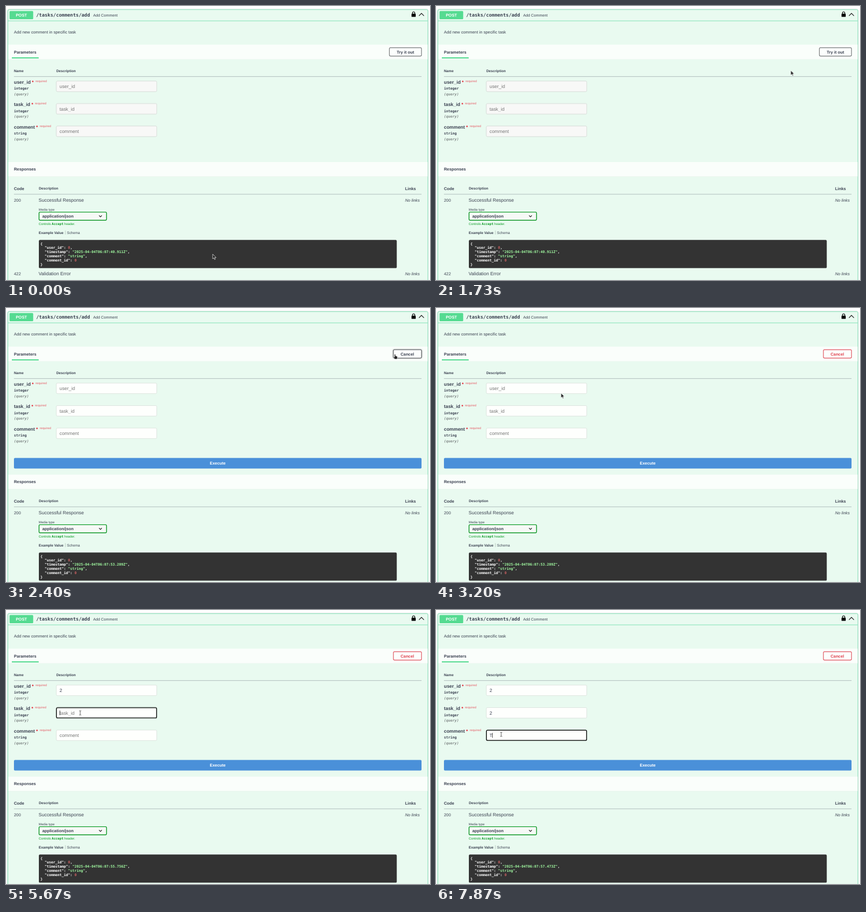
An HTML page that plays this animation: 800 px wide and 518 px high, repeating every 8 s.

```html
<!DOCTYPE html>
<html lang="en">
<head>
<meta charset="utf-8">
<title>API docs: add comment</title>
<style>
html, body { margin: 0; width: 100%; height: 100%; overflow: hidden; background: #fff; }
svg { display: block; width: 800px; height: 518px; }
text {
  font: 7.78px "Liberation Sans", Arial, sans-serif;
  fill: #3b4151; white-space: pre; text-rendering: geometricPrecision;
}
.b { font-weight: 700; }
.i { font-style: italic; }
.l { font-size: 8.89px; }
.s { font-size: 6.67px; }
.xs { font-size: 6.11px; }
.mid { text-anchor: middle; }
.w { fill: #fff; }
.mono { font-family: "DejaVu Sans Mono", monospace; font-weight: 700; }
.code { font-size: 6.67px; fill: #fff; }
.str { fill: #a2fca2; }
.num { fill: #d36363; }
.star { fill: #e3202f; }
.req { font-size: 5.9px; fill: #e5606a; }
.hint { fill: #757575; }
.ok { fill: #0b9a24; }
.strip { fill: #fafefb; filter: drop-shadow(0 .6px .6px rgba(0,0,0,.1)); }
.rule { fill: rgba(59,65,81,.42); }
.field { fill: #fefffd; stroke: #d3d8d4; stroke-width: .7; }
.off { fill: #f8f8f7; }
.btn { fill: #fcfefd; stroke: #747678; stroke-width: 1.15; filter: drop-shadow(0 .5px .6px rgba(0,0,0,.12)); }

/* one shared 8 s clock; switches jump, the pointer glides */
.sw { animation: 8s step-end infinite; }
.idle { animation-name: idle; }
.live { animation-name: live; }
.shift { animation-name: shift; }
.ph1 { animation-name: ph1; } .v1 { animation-name: v1; }
.ph2 { animation-name: ph2; } .v2 { animation-name: v2; }
.ph3 { animation-name: ph3; } .v3 { animation-name: v3; }
.ts2 { animation-name: ts2; } .ts3 { animation-name: ts3; } .ts4 { animation-name: ts4; }
.ring { animation-name: ring; }
.caret { animation-name: caret; }
.hover { animation-name: hand; }
.hand { animation-name: hand; }
.beam { animation-name: beam; }
.arrow { animation-name: arrow; }
.pointer { animation: move 8s linear infinite; }
.edge { animation: edge 8s linear infinite; }
.word { animation: word 8s linear infinite; }

@keyframes idle { 0% { opacity: 1 } 29.875%, 100% { opacity: 0 } }
@keyframes live { 0% { opacity: 0 } 29.875%, 100% { opacity: 1 } }
@keyframes shift { 0% { transform: none } 29.875%, 100% { transform: translateY(20px) } }
@keyframes ph1 { 0% { opacity: 1 } 62.375%, 100% { opacity: 0 } }
@keyframes v1 { 0% { opacity: 0 } 62.375%, 100% { opacity: 1 } }
@keyframes ph2 { 0% { opacity: 1 } 83.25%, 100% { opacity: 0 } }
@keyframes v2 { 0% { opacity: 0 } 83.25%, 100% { opacity: 1 } }
@keyframes ph3 { 0% { opacity: 1 } 98.25%, 100% { opacity: 0 } }
@keyframes v3 { 0% { opacity: 0 } 98.25%, 100% { opacity: 1 } }
@keyframes ts2 { 0% { opacity: 0 } 29.875% { opacity: 1 } 62.375%, 100% { opacity: 0 } }
@keyframes ts3 { 0% { opacity: 0 } 62.375% { opacity: 1 } 83.875%, 100% { opacity: 0 } }
@keyframes ts4 { 0% { opacity: 0 } 83.875%, 100% { opacity: 1 } }
@keyframes ring {
  0% { opacity: 0; transform: none }
  45.75% { opacity: 1; transform: none }
  70.75% { opacity: 1; transform: translateY(42.5px) }
  90.75%, 100% { opacity: 1; transform: translateY(85px) }
}
@keyframes caret {
  0% { opacity: 0; transform: translate(101.2px,147.5px) }
  45.75% { opacity: 1; transform: translate(101.2px,147.5px) }
  53.2% { opacity: 0; transform: translate(101.2px,147.5px) }
  57.4% { opacity: 1; transform: translate(101.2px,147.5px) }
  62.375% { opacity: 1; transform: translate(105.5px,147.5px) }
  68.75% { opacity: 0; transform: translate(105.5px,147.5px) }
  70.75% { opacity: 1; transform: translate(101.2px,190px) }
  78.25% { opacity: 0; transform: translate(101.2px,190px) }
  83.25% { opacity: 1; transform: translate(105.5px,190px) }
  90.75% { opacity: 1; transform: translate(101.2px,232.5px) }
  98.25%, 100% { opacity: 1; transform: translate(106px,232.5px) }
}
@keyframes hand { 0% { opacity: 0 } 27.9% { opacity: 1 } 37.9%, 100% { opacity: 0 } }
@keyframes beam {
  0% { opacity: 0 } 40.4% { opacity: 1 } 63.5% { opacity: 0 }
  67.4% { opacity: 1 } 85.1% { opacity: 0 } 88.6%, 100% { opacity: 1 }
}
@keyframes arrow {
  0% { opacity: 1 } 27.9% { opacity: 0 } 37.9% { opacity: 1 } 40.4% { opacity: 0 }
  63.5% { opacity: 1 } 67.4% { opacity: 0 } 85.1% { opacity: 1 } 88.6%, 100% { opacity: 0 }
}
@keyframes move {
  0%, 6.4% { transform: translate(390px,469px) }
  10.9%, 13.2% { transform: translate(470px,370px) }
  16.6%, 19% { transform: translate(640px,128px) }
  21.6% { transform: translate(669px,122px) }
  29.1%, 37.7% { transform: translate(734px,87px) }
  40% { transform: translate(236px,161px) }
  44.1%, 62.5% { transform: translate(178px,156px) }
  69.1%, 83.4% { transform: translate(140px,194.5px) }
  90%, 100% { transform: translate(123px,235px) }
}
@keyframes edge { 0%, 30% { stroke: #6b6e72 } 33.8%, 100% { stroke: #e4505c } }
@keyframes word { 0%, 30% { fill: #3b4151 } 33.8%, 100% { fill: #e0404e } }
</style>
</head>
<body>
<svg viewBox="0 0 800 518">
  <rect x="3.5" y="6.8" width="792.5" height="540" rx="2.2" fill="#e9faf0" stroke="#62dba6" stroke-width=".8"
        style="filter:drop-shadow(0 0 .8px rgba(0,0,0,.2))"/>
  <rect x="4" y="27.7" width="791.6" height=".8" fill="#62dba6"/>

  <!-- summary bar -->
  <rect x="6.7" y="9.5" width="44.6" height="15.6" rx="1.7" fill="#55db91"/>
  <text class="b w mid" x="29" y="20">POST</text>
  <text class="mono l" x="57" y="20">/tasks/comments/add</text>
  <text x="164.4" y="19.7" style="font-size:7.22px">Add Comment</text>
  <rect x="765.2" y="14.6" width="7.8" height="6" rx=".9"/>
  <path d="M766.9 15V13.2a2.2 2.2 0 0 1 4.4 0V15" fill="none" stroke="#000" stroke-width="1.2"/>
  <path d="M779.2 18.6L783.9 13.9L788.6 18.6" fill="none" stroke="#111" stroke-width="1.2"/>

  <text x="15" y="51.9">Add new comment in specific task</text>

  <!-- parameters -->
  <rect class="strip" x="4" y="73" width="791.6" height="27.8"/>
  <text class="b" x="15" y="89.6">Parameters</text>
  <rect x="11" y="97" width="50.7" height="2.2" fill="#55db91"/>
  <g class="sw idle">
    <rect class="btn" x="723.4" y="78.8" width="60.5" height="15.8" rx="2"/>
    <text class="b mid" x="753.6" y="89.6">Try it out</text>
  </g>
  <g class="sw live">
    <rect class="sw hover" x="730.4" y="78.4" width="54" height="16.6" rx="2.4" fill="#888"
          style="filter:drop-shadow(0 0 1.4px rgba(0,0,0,.45))"/>
    <rect class="btn edge" x="731" y="78.8" width="52.9" height="15.8" rx="2"/>
    <text class="b mid word" x="757.2" y="89.6">Cancel</text>
  </g>
  <text class="b s" x="15" y="124.8">Name</text>
  <text class="b s" x="95" y="124.8">Description</text>
  <rect class="rule" x="15" y="132.9" width="769" height=".8"/>

  <g>
    <text class="b l" x="15" y="146.9">user_id</text>
    <text class="b l star" x="48.7" y="146.9">*</text>
    <text class="req" x="55.5" y="143.7">required</text>
    <text class="mono s" x="15" y="158.2">integer</text>
    <text class="mono s i" x="15" y="168.9" style="fill:#7f8685">(query)</text>
    <rect class="field" x="95" y="142" width="189.4" height="19.8" rx="2"/>
    <rect class="field off sw idle" x="95" y="142" width="189.4" height="19.8" rx="2"/>
    <text class="l hint sw ph1" x="101" y="155">user_id</text>
    <text class="l sw v1" x="101" y="155">2</text>
  </g>
  <g transform="translate(0 42.5)">
    <text class="b l" x="15" y="146.9">task_id</text>
    <text class="b l star" x="47.9" y="146.9">*</text>
    <text class="req" x="54.4" y="143.7">required</text>
    <text class="mono s" x="15" y="158.2">integer</text>
    <text class="mono s i" x="15" y="168.9" style="fill:#7f8685">(query)</text>
    <rect class="field" x="95" y="142" width="189.4" height="19.8" rx="2"/>
    <rect class="field off sw idle" x="95" y="142" width="189.4" height="19.8" rx="2"/>
    <text class="l hint sw ph2" x="101" y="155">task_id</text>
    <text class="l sw v2" x="101" y="155">2</text>
  </g>
  <g transform="translate(0 85)">
    <text class="b l" x="15" y="146.9">comment</text>
    <text class="b l star" x="56.8" y="146.9">*</text>
    <text class="req" x="63.5" y="143.7">required</text>
    <text class="mono s" x="15" y="158.2">string</text>
    <text class="mono s i" x="15" y="168.9" style="fill:#7f8685">(query)</text>
    <rect class="field" x="95" y="142" width="189.4" height="19.8" rx="2"/>
    <rect class="field off sw idle" x="95" y="142" width="189.4" height="19.8" rx="2"/>
    <text class="l hint sw ph3" x="101" y="155">comment</text>
    <text class="l sw v3" x="101" y="155">T</text>
  </g>
  <rect class="sw ring" x="95.2" y="142.2" width="189" height="19.4" rx="2.2" fill="none" stroke="#0c0f0d" stroke-width="1.5"/>
  <rect class="sw caret" width=".8" height="9" fill="#111"/>

  <g class="sw live">
    <rect x="15" y="283.4" width="769" height="20" rx="2" fill="#4a90d9"/>
    <text class="b w mid" x="399.5" y="296.2">Execute</text>
  </g>

  <!-- responses -->
  <g class="sw shift">
    <rect class="strip" x="4" y="295" width="791.6" height="27.4"/>
    <text class="b" x="15" y="311.3">Responses</text>
    <text class="b" x="15" y="347.6">Code</text>
    <text class="b s" x="62" y="347.2">Description</text>
    <text class="b" x="753" y="347.6">Links</text>
    <rect class="rule" x="15" y="355.5" width="769" height=".8"/>

    <text x="15" y="369.6">200</text>
    <text class="l" x="61.6" y="369.9">Successful Response</text>
    <text class="i" x="753" y="369.6">No links</text>
    <text class="xs" x="61.8" y="386.6">Media type</text>
    <rect x="62.4" y="389.6" width="127.2" height="15.4" rx="2" fill="#f6f9f6" stroke="#0b9a24" stroke-width="1.4"
          style="filter:drop-shadow(0 .5px .6px rgba(0,0,0,.2))"/>
    <text class="b" x="68.4" y="400.1">application/json</text>
    <path d="M175.6 396L178.2 398.6L180.8 396" fill="none" stroke="#222" stroke-width="1.1"/>
    <text class="xs ok" x="61.8" y="413.6">Controls <tspan class="mono">Accept</tspan> header.</text>
    <text class="b s" x="61.8" y="430.8">Example Value</text>
    <rect x="111.7" y="424.6" width=".6" height="7.4" fill="#9aa8a1"/>
    <text class="s" x="115" y="430.8">Schema</text>

    <rect x="62" y="442.2" width="675.3" height="53.4" rx="2.2" fill="#333"/>
    <text class="mono code" x="65" y="451.6">{</text>
    <text class="mono code" x="65" y="459.4">  "user_id": <tspan class="num">0</tspan>,</text>
    <text class="mono code" x="65" y="467.2">  "timestamp": </text>
    <g class="sw idle"><text class="mono code" x="125.2" y="467.2"><tspan class="str">"2025-04-04T06:07:40.911Z"</tspan>,</text></g>
    <g class="sw ts2"><text class="mono code" x="125.2" y="467.2"><tspan class="str">"2025-04-04T06:07:53.209Z"</tspan>,</text></g>
    <g class="sw ts3"><text class="mono code" x="125.2" y="467.2"><tspan class="str">"2025-04-04T06:07:55.756Z"</tspan>,</text></g>
    <g class="sw ts4"><text class="mono code" x="125.2" y="467.2"><tspan class="str">"2025-04-04T06:07:57.473Z"</tspan>,</text></g>
    <text class="mono code" x="65" y="475">  "comment": <tspan class="str">"string"</tspan>,</text>
    <text class="mono code" x="65" y="482.8">  "comment_id": <tspan class="num">0</tspan></text>
    <text class="mono code" x="65" y="490.6">}</text>

    <text x="15" y="508.7">422</text>
    <text class="l" x="61.6" y="509">Validation Error</text>
    <text class="i" x="753" y="508.7">No links</text>
  </g>

  <g class="pointer">
    <path class="sw arrow" d="M0 0V9L2.1 7.1L3.5 10.3L5 9.6L3.6 6.6H6.4Z" fill="#222" stroke="#fff" stroke-width=".7"/>
    <path class="sw hand" d="M-1 .8Q0 -.4 .9 .8V3.6L3.6 4.2Q4.6 4.5 4.5 5.6L3.9 9.6H-.5L-2.6 6.4Q-2.6 5.2 -1 6Z"
          fill="#222" stroke="#fff" stroke-width=".5"/>
    <path class="sw beam" d="M-2 -4H-.5L0 -3.5L.5 -4H2M0 -3.5V3.5M-2 4H-.5L0 3.5L.5 4H2" fill="none" stroke="#333" stroke-width=".8"/>
  </g>
</svg>
</body>
</html>
```
